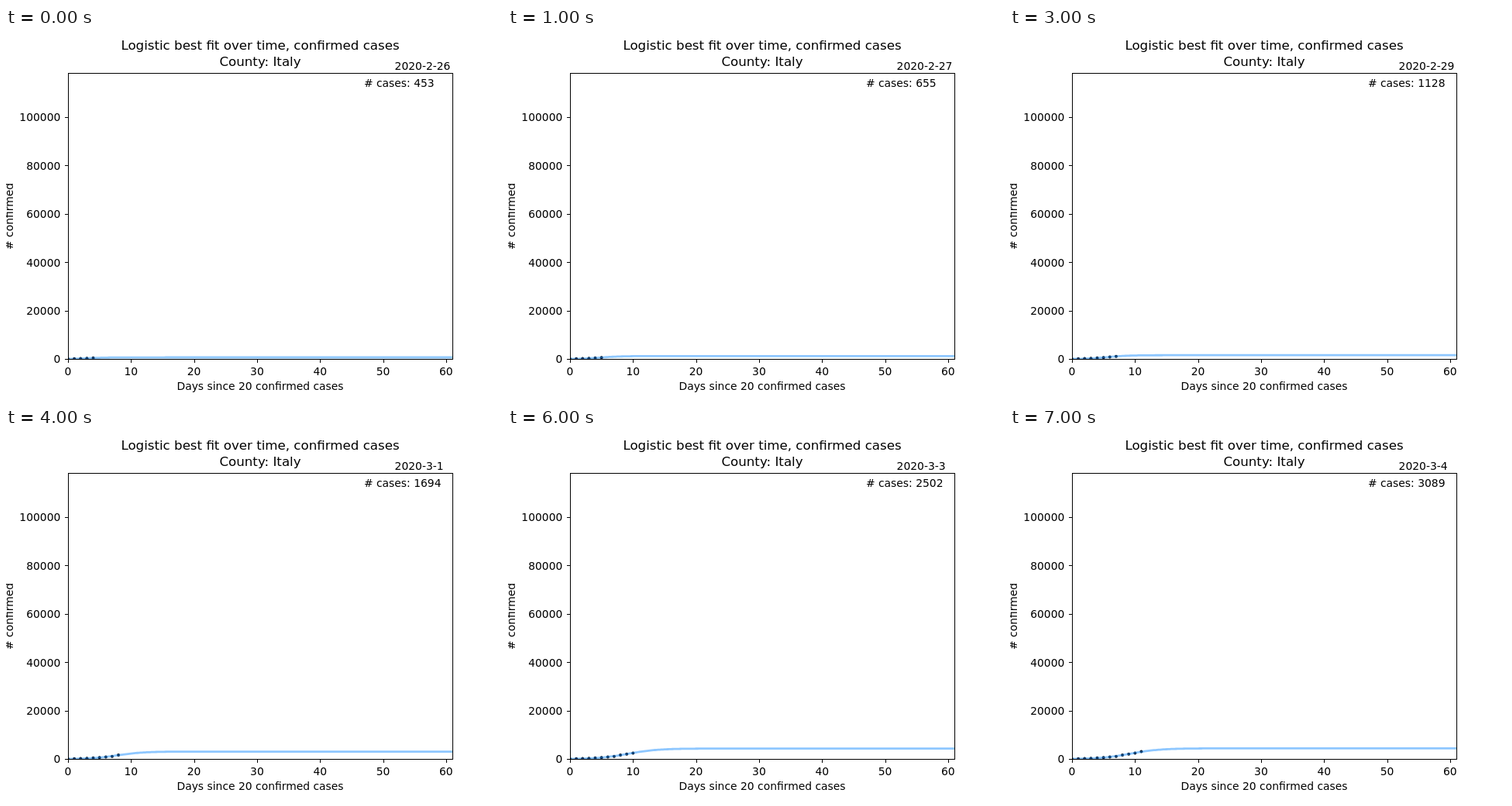
Recreate the animation shown at these times as an HTML page with a canvas. Size 640 px wide and 480 px high, loop 8 s.

```html
<!DOCTYPE html>
<html lang="en">
<head>
<meta charset="utf-8">
<title>Logistic best fit</title>
<style>
  html, body { margin: 0; width: 640px; height: 480px; overflow: hidden; background: #fff; }
  canvas { display: block; }
</style>
</head>
<body>
<canvas id="stage" width="640" height="480"></canvas>
<script>
const ctx = document.getElementById('stage').getContext('2d');
const LEFT = 80, RIGHT = 576, TOP = 57.6, BOTTOM = 427.2;
const STEP_MS = 1000, FIRST_DAY = 4;
const FONT = '"DejaVu Sans", sans-serif';

const cases = [62, 155, 229, 322, 453, 655, 888, 1128, 1694, 2036, 2502, 3089];
const dates = ['2-26', '2-27', '2-28', '2-29', '3-1', '3-2', '3-3', '3-4'];
// Logistic parameters per day: ceiling, growth rate, midpoint
const fits = [
  [700, 0.65, 3.15], [1250, 0.6, 4.87], [1350, 0.63, 5.05], [1600, 0.58, 5.6],
  [3100, 0.48, 7.82], [4300, 0.43, 9.2], [4350, 0.425, 9.2], [4430, 0.42, 9.24]
];

const xPos = day => LEFT + day * (RIGHT - LEFT) / 61;
const yPos = count => BOTTOM - count * 0.0031225;

function label(text, x, y, align = 'left', size = 13.89) {
  ctx.font = `${size}px ${FONT}`;
  ctx.textAlign = align;
  ctx.fillText(text, x, y);
}

function drawData(step) {
  ctx.save();
  ctx.beginPath();
  ctx.rect(LEFT, TOP, RIGHT - LEFT, BOTTOM - TOP);
  ctx.clip();

  ctx.fillStyle = '#000';
  cases.slice(0, FIRST_DAY + step + 1).forEach((count, day) => {
    ctx.beginPath();
    ctx.arc(xPos(day), yPos(count), 2, 0, Math.PI * 2);
    ctx.fill();
  });

  const [ceiling, rate, middle] = fits[step];
  ctx.beginPath();
  for (let day = 0; day <= 61; day += 0.25) {
    ctx.lineTo(xPos(day), yPos(ceiling / (1 + Math.exp(-rate * (day - middle)))));
  }
  ctx.strokeStyle = 'rgba(30, 144, 255, 0.5)';
  ctx.lineWidth = 2.78;
  ctx.lineJoin = 'round';
  ctx.stroke();
  ctx.restore();
}

function drawAxes() {
  ctx.fillStyle = '#000';
  ctx.fillRect(80, 58, 497, 1);
  ctx.fillRect(80, 427, 497, 1);
  ctx.fillRect(80, 58, 1, 370);
  ctx.fillRect(576, 58, 1, 370);

  for (let day = 0; day <= 60; day += 10) {
    ctx.fillRect(Math.round(xPos(day)), 428, 1, 4);
    label(day, xPos(day), 448, 'center');
  }
  for (let count = 0; count <= 100000; count += 20000) {
    const y = yPos(count);
    ctx.fillRect(76, Math.round(y), 4, 1);
    label(count, 70.3, Math.round(y + 5.28), 'right');
  }

  label('Days since 20 confirmed cases', 328, 467, 'center');
  label('Logistic best fit over time, confirmed cases', 328, 28, 'center', 16.67);
  label('County: Italy', 328, 49, 'center', 16.67);

  ctx.save();
  ctx.translate(9, 243);
  ctx.rotate(-Math.PI / 2);
  label('# confirmed', 0, 0, 'center');
  ctx.restore();
}

function draw(now) {
  const step = Math.floor(now / STEP_MS) % dates.length;
  ctx.fillStyle = '#fff';
  ctx.fillRect(0, 0, 640, 480);
  drawData(step);
  drawAxes();
  label(`2020-${dates[step]}`, 501.6, 54);
  label(`# cases: ${cases[FIRST_DAY + step]}`, 461.9, 76);
}

const start = performance.now();
function tick() {
  draw(performance.now() - start);
  requestAnimationFrame(tick);
}
tick();
</script>
</body>
</html>
```
